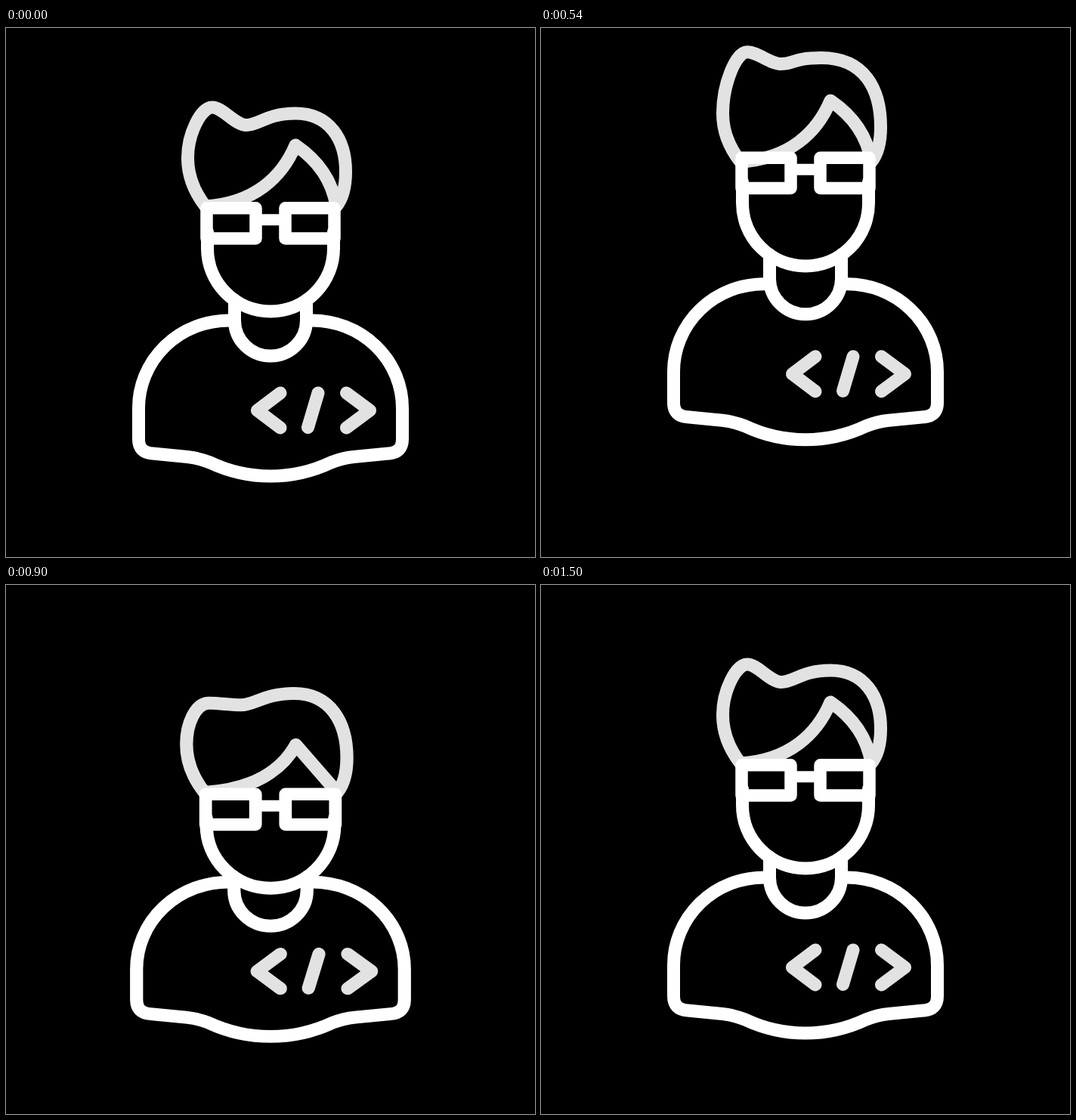
Recreate the animation shown at these times as an HTML page. Size 700 px wide and 700 px high, loop 2.03 s.

```html
<!DOCTYPE html>
<html lang="en">
<head>
<meta charset="utf-8">
<title>Developer hop</title>
<style>
  html, body { margin: 0; width: 100%; height: 100%; overflow: hidden; background: #000; }
  svg { display: block; width: 100%; height: 100%; }
  path { fill: none; stroke: #fff; stroke-width: 17; stroke-linecap: round; stroke-linejoin: round; }
  .soft { stroke: #e2e2e2; }
  #glasses path { stroke-width: 16.5; }
  #glasses .bridge { stroke-width: 15; }
</style>
</head>
<body>
<svg viewBox="0 0 700 700">
  <g id="figure">
    <path id="hair" class="soft"/>
    <g id="torso">
      <path d="M302 387H295A119.5 116 0 0 0 175.5 503V544Q175.5 562 194 563L240 567.5Q255 569 270 575Q308 593 350 593Q392 593 430 575Q445 569 460 567.5L506 563Q524.5 562 524.5 544V503A119.5 116 0 0 0 405 387H398"/>
      <path class="soft" d="M363 483L332.5 506L363 529M413 483L399.5 528.5M450.5 483L481.5 506L450.5 529"/>
    </g>
    <path id="neck"/>
    <path id="face"/>
    <g id="glasses">
      <path d="M265.5 238.3h65v40.2h-65zM369.5 238.3h65v40.2h-65z"/>
      <path class="bridge" d="M330.5 253.7h39"/>
    </g>
  </g>
</svg>
<script>
const LOOP = 2030, STEP = 30, END = 1500, HOP = 540;

// Turning points [ms, px]: height of the body, and how far the head lags behind it
const BODY = [[0, 0], [80, 15], [423, -62], [844, 15], [960, -7.5], [1268, 4], [END, 0]];
const LAG = [[0, 0], [100, 32], [510, -19.5], [840, 40], [2 * HOP, 0], [END, 0]];

const el = id => document.getElementById(id);
const [figure, hair, torso, neck, face, glasses] =
  ['figure', 'hair', 'torso', 'neck', 'face', 'glasses'].map(el);

const mix = (a, b, k) => a + (b - a) * k;
const shift = (node, y) => node.setAttribute('transform', `translate(0 ${y})`);

// Sine easing from one turning point to the next
function swing(points, t) {
  const i = Math.max(1, points.findIndex(p => p[0] >= t));
  const [t0, a] = points[i - 1], [t1, b] = points[i];
  return mix(a, b, (1 - Math.cos(Math.PI * (t - t0) / (t1 - t0))) / 2);
}

// flop: 0 is the crisp quiff, 1 is the flattened one
function hairPath(head, lag, flop) {
  const lift = Math.max(0, -lag) * 0.42;
  const base = head + lift;
  const side = 172 + base, right = 190 + base, foot = 236 + base;
  const tip = 155 + base + 18 * flop;
  const bulge = 113 + head - 8 * flop - 0.9 * lift;
  const dip = 128.5 + head - 15 * flop + 0.2 * lag - 1.4 * lift;
  const crest = 105 + head + 0.37 * lag;
  const crestX = 273 - 3 * flop, dipX = 318 - 6 * flop;
  const bulgeX = 383 - 11 * flop + 0.25 * lag - lift;
  return `M264 ${foot}C250 ${foot - 18} 240.5 ${side + 25} 240.5 ${side}`
    + `C240.5 ${mix(side, crest, 0.48)} ${258 - 6 * flop} ${crest} ${crestX} ${crest}`
    + `C${crestX + 14} ${crest} ${dipX - 15} ${dip} ${dipX} ${dip}`
    + `C${dipX + 17} ${dip} ${bulgeX - 38} ${bulge} ${bulgeX} ${bulge}`
    + `C428 ${bulge} 449.5 ${mix(bulge, right, 0.45)} 449.5 ${right}`
    + `C449.5 ${right + 20} 445 ${foot - 10} 437 ${foot}`
    + `C${432 - 13 * flop} ${mix(foot, tip, 0.4 - 0.07 * flop)}`
    + ` ${414 - 13 * flop} ${mix(foot, tip, 0.74 - 0.07 * flop)} 383 ${tip}`
    + `C365 ${mix(tip, foot, 0.53)} 328 ${foot - 4} 264 ${foot}Z`;
}

function draw(t) {
  const body = swing(BODY, t), lag = swing(LAG, t);
  const head = body + lag, chin = body + 0.64 * lag, collar = body + 0.38 * lag;
  const squash = Math.max(0, head - 16) * 0.0007;
  const flop = t < 2 * HOP ? Math.min(1, 1.5 * Math.abs(Math.sin(Math.PI * t / HOP))) : 0;
  const sx = 1 + squash, sy = 1 - 0.55 * squash;

  figure.setAttribute('transform', `translate(${350 - 350 * sx} 0) scale(${sx} 1)`);
  torso.setAttribute('transform', `translate(0 ${body + 593 * (1 - sy)}) scale(1 ${sy})`);
  neck.setAttribute('d', `M302.5 ${360 + chin}V${387 + collar}a47.5 47 0 0 0 95 0V${360 + chin}`);
  face.setAttribute('d', `M266.5 ${270 + head}V${291.5 + chin}a83.5 83.5 0 0 0 167 0V${270 + head}`);
  shift(glasses, head);
  hair.setAttribute('d', hairPath(head, lag, flop));
}

function tick() {
  const t = performance.now() % LOOP;
  draw(Math.min(END, Math.floor(t / STEP) * STEP));
  requestAnimationFrame(tick);
}
tick();
</script>
</body>
</html>
```
